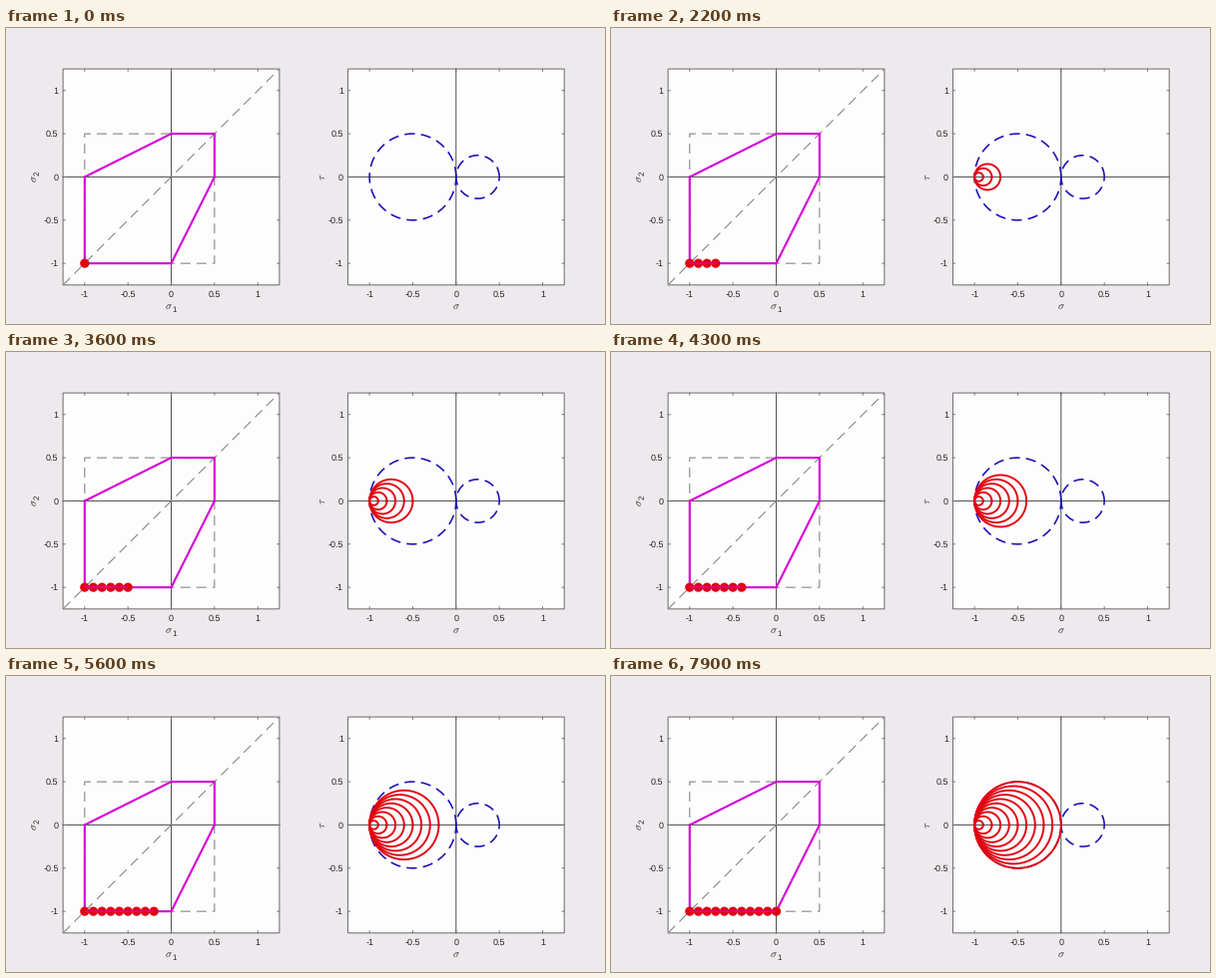
A matplotlib script for the animation above (8 s loop, 600 px wide and 297 px high).

```python
import numpy as np
import matplotlib.pyplot as plt
from matplotlib.animation import FuncAnimation

W, H, DPI = 600, 297, 100
UNIT, LIM = 86.7, 1.25
LEFT, RIGHT, MID = 165.5, 450.8, 149.45
RED, BLUE, MAGENTA = "#e1000f", "#1a10b4", "#d600d6"
INK, AXIS, FRAME, GREY = "#262626", "#505050", "#6c6c6c", "#858585"
FRAMES, INTERVAL = 80, 100
STEPS = 10

plt.rcParams.update({
    "font.family": "Liberation Sans",
    "mathtext.fontset": "cm",
    "path.snap": False,
    "text.hinting": "none",
})

fig = plt.figure(figsize=(W / DPI, H / DPI), dpi=DPI, facecolor="#ede9ec")
ax = fig.add_axes([0, 0, 1, 1])
ax.set(xlim=(0, W), ylim=(H, 0))
ax.axis("off")


def pt(px):
    return px * 72 / DPI


def draw(x0, xs, ys, color, width, z, dash=None, **kw):
    """Plot data coordinates in the panel whose origin lies at x0."""
    line, = ax.plot(x0 + UNIT * np.asarray(xs), MID - UNIT * np.asarray(ys),
                    color=color, lw=pt(width), zorder=z, **kw)
    if dash:
        line.set_linestyle((0, [d / width for d in dash]))
    return line


def circle(centre, radius):
    a = np.linspace(0, 2 * np.pi, 181)
    return centre + radius * np.cos(a), radius * np.sin(a)


def label(x, y, text, px, **kw):
    ax.text(x, y, text, fontsize=pt(px), color=INK, zorder=9, **kw)


def panel(x0):
    r = LIM * UNIT
    ax.add_patch(plt.Rectangle((x0 - r, MID - r), 2 * r, 2 * r, fc="#fefdfe",
                               ec=FRAME, lw=pt(1), zorder=1))
    draw(x0, [-LIM, LIM], [0, 0], AXIS, 1, 2)
    draw(x0, [0, 0], [-LIM, LIM], AXIS, 1, 2)
    tick = 2.2 / UNIT
    for v in (-1, -0.5, 0, 0.5, 1):
        for s in (-1, 1):
            edge = [s * LIM, s * (LIM - tick)]
            draw(x0, [v, v], edge, FRAME, 0.9, 2)
            draw(x0, edge, [v, v], FRAME, 0.9, 2)
        label(x0 + v * UNIT, 270.2, f"{v:g}", 9, ha="center", va="baseline")
        label(x0 - r - 4.5, MID - v * UNIT + 3.2, f"{v:g}", 9,
              ha="right", va="baseline")


panel(LEFT)
panel(RIGHT)

centred = dict(ha="center", va="center")
label(163, 279.5, r"$\sigma$", 10.5, **centred)
label(168.5, 283, "1", 8, **centred)
label(28.5, 151.5, r"$\sigma$", 10.5, rotation=90, **centred)
label(32, 146, "2", 8, rotation=90, **centred)
label(RIGHT, 279.5, r"$\sigma$", 10.5, **centred)
label(317, MID, r"$\tau$", 10.5, rotation=90, **centred)

# Yield loci and guides
draw(LEFT, [-LIM, LIM], [-LIM, LIM], GREY, 1.1, 3, (10, 6))
draw(LEFT, [-1, 0.5, 0.5, -1, -1], [-1, -1, 0.5, 0.5, -1], GREY, 1.1, 3, (10, 6))
draw(LEFT, [-1, -1, 0, 0.5, 0.5, 0, -1], [-1, 0, 0.5, 0.5, 0, -1, -1],
     MAGENTA, 2.1, 4, solid_joinstyle="miter")
for centre, radius in ((-0.5, 0.5), (0.25, 0.25)):
    draw(RIGHT, *circle(centre, radius), BLUE, 1.6, 4, (10.3, 6.2))

# Stress states and their Mohr circles
dots = [ax.add_patch(plt.Circle((LEFT + UNIT * (0.1 * k - 1), MID + UNIT), 4.6,
                                fc=RED, ec="none", zorder=5))
        for k in range(STEPS + 1)]
trace = draw(LEFT, [], [], MAGENTA, 1.8, 6, alpha=0.65, solid_capstyle="butt")
rings = [draw(RIGHT, *circle(-1 + 0.05 * k, 0.05 * k), RED, 1.9, 7)
         for k in range(1, STEPS + 1)]


def update(n):
    step = min(STEPS, int((n + 1.4) / 6.85))
    for k, dot in enumerate(dots):
        dot.set_visible(k <= step)
    for k, ring in enumerate(rings, 1):
        ring.set_visible(k <= step)
    end = LEFT + UNIT * (0.1 * step - 1)
    trace.set_data([LEFT - UNIT, end], [MID + UNIT] * 2)
    return [*dots, trace, *rings]


anim = FuncAnimation(fig, update, frames=FRAMES, interval=INTERVAL,
                     repeat=True, repeat_delay=0, blit=False)
plt.show()
```
